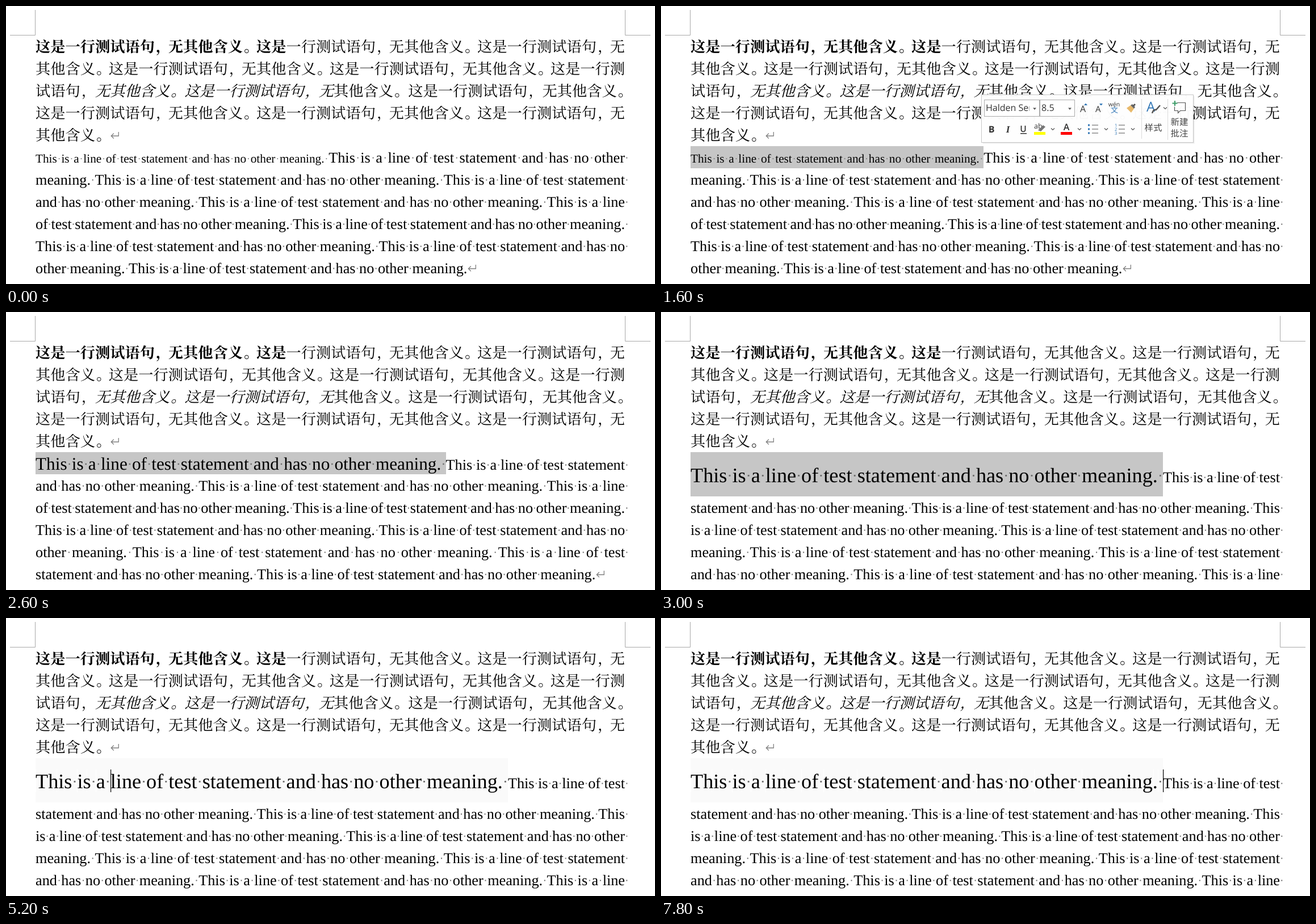
An HTML page for the animation above (8 s loop, 1143x490 px).

```html
<!DOCTYPE html>
<html lang="zh-CN">
<head>
<meta charset="utf-8">
<title>Growing a selected sentence</title>
<style>
  html, body { margin: 0; width: 100%; height: 100%; overflow: hidden; background: #fff; }
  svg { display: block; text-rendering: geometricPrecision; }
  .latin { font-family: "Liberation Serif", serif; }
  .han { font: 300 26.25px "Noto Serif CJK SC", "Noto Sans CJK SC", "Noto Sans CJK", serif; }
  .bold { font-weight: 600; }
  .italic { font-style: italic; }
  .ui { font-family: "Open Sans", "Noto Sans", sans-serif; fill: #333; }
  .label { font: 15.5px "Noto Sans CJK SC", "Noto Sans CJK", sans-serif; fill: #444; text-anchor: middle; }
  .line { fill: none; stroke: #555; stroke-width: 1.2; }
  .mark { fill: none; stroke: #808080; stroke-width: 1.3; }
</style>
</head>
<body>
<svg width="1143" height="490" viewBox="0 0 1143 490">
  <path d="M7 51.5H51.5V7M1135 51.5H1090.5V7" fill="none" stroke="#a9a9a9"/>
  <g id="shade"></g>
  <g id="han" class="han"></g>
  <g id="latin" class="latin"></g>
  <rect id="caret" width="1.2"/>
  <g id="bar"></g>
</svg>
<script>
const LOOP = 8000, LEFT = 52, WIDTH = 1038, TOP = 247, ROW = 39, BASE = 29;
const PT = 2.5, BODY = 10.5 * PT;
const $ = id => document.getElementById(id);
const pen = document.createElement('canvas').getContext('2d');
pen.font = '1000px "Liberation Serif", serif';

const sentence = 'This is a line of test statement and has no other meaning.'.split(' ');
const words = Array.from({ length: 120 }, (_, i) => sentence[i % 12]);
const em = {};
for (const w of [...sentence, ' ']) em[w] = pen.measureText(w).width / 1000;

// Words per line for each size of the first sentence
const breaks = {
  8.5: [23, 20, 21, 20, 22, 14],
  9.5: [23, 20, 21, 20, 22, 14],
  10.5: [22, 20, 19, 22, 20, 17],
  12.5: [19, 21, 20, 22, 20, 18],
  13.5: [18, 19, 22, 20, 21, 20],
  14.5: [18, 19, 22, 20, 21, 20]
};

// sel: true reaches to the end of the first sentence, a number is an x position
const steps = [
  { t: 0 },
  { t: 400, caret: 52 },
  { t: 800, sel: 206 },
  { t: 1000, sel: 392 },
  { t: 1200, sel: 561 },
  { t: 1600, sel: true, bar: true },
  { t: 2000, sel: true },
  { t: 2200, sel: true, size: 9.5 },
  { t: 2400, sel: true, size: 10.5 },
  { t: 2600, sel: true, size: 12.5 },
  { t: 2800, sel: true, size: 13.5 },
  { t: 3000, sel: true, size: 14.5 },
  { t: 3600, size: 14.5 }
];
const walk = [
  [3800, 52], [4200, 89], [4400, 125], [4800, 142], [5000, 158], [5200, 184],
  [5400, 216], [5600, 247], [5800, 286], [6000, 345], [6200, 493], [6400, 555],
  [6600, 612], [6800, 635], [7000, 657], [7200, 741], [7400, 867], [7600, 875], [7800, 884]
];
for (const [t, caret] of walk) steps.push({ t, caret, size: 14.5 });

const returnMark = (x, y) =>
  `<path class="mark" d="M${x + 15} ${y - 6}v7H${x + 2}m4.5-4.5l-4.5 4.5 4.5 4.5"/>`;

function drawHan() {
  const text = '这是一行测试语句，无其他含义。'.repeat(11);
  let out = '';
  for (let row = 0; row * 40 < text.length; row++) {
    const squeeze = row === 2 || row === 4 ? 0 : 2.4;
    let x = LEFT;
    [...text.slice(row * 40, row * 40 + 40)].forEach((ch, i) => {
      const n = row * 40 + i, stop = '，。'.includes(ch);
      const style = n < 17 ? 'bold' : n > 83 && n < 100 ? 'italic' : '';
      out += `<text class="${style}" x="${x + (stop ? 2 : 0)}" y="${52 + BASE + row * ROW}">${ch}</text>`;
      x += BODY - (stop ? squeeze : 0);
    });
    if (row === 4) out += returnMark(x, 228);
  }
  $('han').innerHTML = out;
}

function layout(size) {
  const big = size * PT;
  const first = size > 14 ? 2 * ROW : ROW;
  const sizeOf = n => n < 12 ? big : BODY;
  let out = '', n = 0, end = 0;
  breaks[size].forEach((count, row, all) => {
    const last = row === all.length - 1;
    let ink = 0, gaps = 0;
    for (let i = n; i < n + count; i++) {
      ink += em[words[i]] * sizeOf(i);
      if (i < n + count - 1) gaps += em[' '] * sizeOf(i);
    }
    const stretch = last && ink + gaps < WIDTH ? 1 : (WIDTH - ink) / gaps;
    const base = row
      ? TOP + first + (row - 1) * ROW + BASE
      : Math.round(TOP + first / 2 + 0.38 * Math.max(big, BODY) - 0.1);
    let x = LEFT;
    for (let i = 0; i < count; i++, n++) {
      const s = sizeOf(n), final = i === count - 1;
      out += `<text x="${x.toFixed(2)}" y="${base}" font-size="${s}">${words[n]}</text>`;
      x += em[words[n]] * s;
      if (last && final) { out += returnMark(x, base - 9); continue; }
      const gap = em[' '] * s * (final ? 1 : stretch), d = 0.078 * s;
      out += `<rect x="${(x + gap / 2 - d / 2).toFixed(2)}" y="${base - 0.32 * s - d / 2}" width="${d}" height="${d}" fill="#6c6c6c"/>`;
      x += gap;
      if (n === 11) end = x;
    }
  });
  return { out, end, height: first };
}

function drawBar() {
  const arrow = (x, y) => `<path d="M${x - 3} ${y - 1.5}h6l-3 3.5z" fill="#555"/>`;
  const chevron = (x, y) => `<path class="line" d="M${x - 3} ${y - 1.5}l3 3 3-3"/>`;
  const ui = (x, y, size, text, more = '') =>
    `<text class="ui" x="${x}" y="${y}" font-size="${size}" ${more}>${text}</text>`;
  const box = (x, y, w, h, fill, more = '') =>
    `<rect x="${x}" y="${y}" width="${w}" height="${h}" fill="${fill}" ${more}/>`;
  const row = i => 210 + i * 7;
  let out = box(566.5, 158.5, 373, 84, '#000', 'opacity=".08"')
    + box(564.5, 156.5, 373, 84, '#fff', 'fill-opacity=".97" stroke="#c6c6c6"')
    + box(569.5, 165.5, 97, 29, '#fff', 'stroke="#ababab"')
    + box(667.5, 165.5, 61, 29, '#fff', 'stroke="#ababab"')
    + '<clipPath id="field"><rect x="570" y="166" width="79" height="28"/></clipPath>'
    + ui(572, 185, 16, 'Halden Ser', 'clip-path="url(#field)"')
    + ui(670, 185, 16, '8.5') + arrow(658, 181) + arrow(720, 181)
    + ui(738, 187, 16, 'A') + '<path d="M745 175h6l-3-3.5z" fill="#2f75b5"/>'
    + ui(765, 187, 15, 'A') + '<path d="M772 172h6l-3 3.5z" fill="#2f75b5"/>'
    + ui(798, 177, 10.5, 'wén', 'text-anchor="middle"')
    + '<text class="label" x="798.5" y="188" style="font-size:13px;fill:#2f75b5">文</text>'
    + '<path d="M820 180l7-5 6 6-5 7z" fill="#e8b96b"/><path d="M827 175l3-2 5 5-2 3z" fill="#666"/><path d="M831 175l3-3 2 2-3 3z" fill="#555"/>'
    + '<path d="M846.5 164V234M892.5 164V236" stroke="#dcdcdc"/>'
    + ui(855, 186, 24, 'A', 'style="fill:#2f75b5"')
    + '<path d="M865 189q2-7 7-6l7-8" fill="none" stroke="#555" stroke-width="2.5"/>' + chevron(888, 180)
    + '<path class="line" d="M909 170.500h14.500v14h-9l-4 4v-4h-6v-7"/><path d="M905 167v9M900.500 171.500h9" stroke="#3b9b67" stroke-width="2"/>'
    + '<text class="label" x="867" y="220">样式</text><text class="label" x="913" y="210">新建</text><text class="label" x="913" y="230">批注</text>'
    + ui(582, 223, 16, 'B', 'text-anchor="middle" font-weight="700"')
    + ui(611, 223, 17, 'I', 'text-anchor="middle" font-weight="600" style="font-family:Liberation Serif,serif;font-style:italic"')
    + ui(638, 222, 15.5, 'U', 'text-anchor="middle" font-weight="600"') + box(633, 224, 11, 1.5, '#333')
    + ui(657, 216, 12.5, 'ab') + '<path d="M664 219l9-9 4 3-8 8z" fill="#777"/>'
    + box(657, 222, 20, 5, '#ff0')
    + ui(714, 219, 16, 'A', 'text-anchor="middle" font-weight="600"') + box(704, 222, 20, 5, '#f00');
  for (const x of [690, 737, 784, 831]) out += chevron(x, 217);
  for (let i = 0; i < 3; i++) {
    out += box(752, row(i) - 1.5, 3, 3, '#2f75b5') + box(759, row(i) - 0.5, 11, 1, '#555')
      + ui(799, row(i) + 3, 7.5, i + 1, 'style="fill:#2f75b5"') + box(806, row(i) - 0.5, 11, 1, '#555');
  }
  $('bar').innerHTML = out;
}

function show(step) {
  const { size = 8.5, sel, caret, bar, t } = step;
  const para = layout(size);
  $('latin').innerHTML = para.out;
  const strip = (to, fill) =>
    `<rect x="${LEFT}" y="${TOP}" width="${to - LEFT}" height="${para.height}" fill="${fill}"/>`;
  let shade = '';
  if (sel) shade = strip(sel === true ? Math.round(para.end) : sel, '#c6c6c6');
  else if (t >= 3600) {
    shade = strip(884, '#fafafa');
    // Pale traces where the caret has been
    for (const [at, x] of walk)
      if (at < t) shade += `<rect x="${x}" y="267" width="1" height="40" fill="#fff"/>`;
  }
  $('shade').innerHTML = shade;
  $('bar').setAttribute('visibility', bar ? 'visible' : 'hidden');
  const c = $('caret'), tall = size > 14;
  c.setAttribute('visibility', caret ? 'visible' : 'hidden');
  c.setAttribute('x', caret || 0);
  c.setAttribute('y', tall ? 267 : 258);
  c.setAttribute('height', tall ? 40 : 23);
}

drawHan();
drawBar();
let current;
const start = performance.now();
function tick() {
  const t = (performance.now() - start) % LOOP;
  const step = steps.findLast(s => s.t <= t) || steps[0];
  if (step !== current) show(current = step);
  requestAnimationFrame(tick);
}
tick();
</script>
</body>
</html>
```
